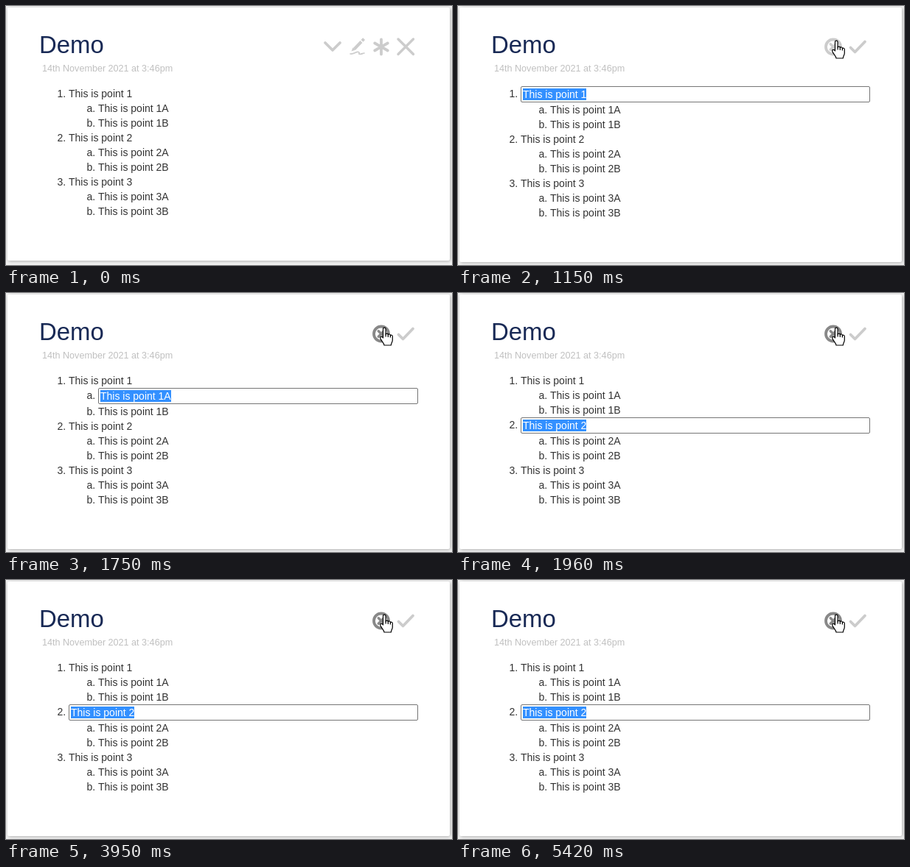
An HTML page for the animation above (5.55 s loop, 605 by 352 pixels).

```html
<!DOCTYPE html>
<html lang="en">
<head>
<meta charset="utf-8">
<title>Reordering a list</title>
<style>
  html, body { margin: 0; width: 100%; height: 100%; overflow: hidden; }
  body {
    position: relative;
    background: #f4f4f4;
    color: #333;
    font: 14px/20px "Liberation Sans", Arial, sans-serif;
  }
  .card {
    position: absolute; left: 2px; top: 2px; width: 600px; height: 344px;
    background: #fff; border-radius: 2px;
    box-shadow: 1px 1px 5px rgba(0, 0, 0, .3);
  }
  .editing .card { height: 346px; }
  h1, .date, .list { position: absolute; margin: 0; white-space: nowrap; }
  h1 { left: 45px; top: 33px; font-size: 32.9px; line-height: 40px; font-weight: 300; color: #182955; }
  .date { left: 49px; top: 75px; font-size: 12.6px; color: #c0c0c0; }
  .list { left: 45px; top: 109px; width: 514px; }
  ol { margin: 0; padding: 0 0 0 40px; list-style: decimal; }
  ol ol { list-style: lower-alpha; }
  .field {
    display: inline-block; vertical-align: top; box-sizing: border-box;
    width: 100%; height: 22px; padding: 2px;
    border: 1px solid #767676; border-radius: 2px;
    line-height: 16px;
  }
  .field span { display: inline-block; height: 16px; background: #3390ff; color: #fff; }
  svg { position: absolute; left: 0; top: 0; }
  .icon { fill: none; stroke: #ccc; stroke-width: 3.8; stroke-linecap: round; stroke-linejoin: round; }
  .edit, .editing .view { display: none; }
  .editing .edit { display: inline; }
</style>
</head>
<body>
<div class="card"></div>
<h1>Demo</h1>
<div class="date">14th November 2021 at 3:46pm</div>
<div class="list"></div>

<svg width="605" height="352" viewBox="0 0 605 352">
  <g class="icon view">
    <path d="M433 50l10 10 10-10"/>
    <path stroke-width="4" stroke-linecap="butt" d="M472.5 58.5L482 48.500M483 47.400l2.600-2.800"/>
    <path stroke="none" fill="#ccc" d="M468.500 61.500l2-5 3.500 3.300z"/>
    <path stroke-width="1.700" d="M467 65c5 1 8-3.500 11-2.500s-1 3 2 3 4-1.500 6-1.500"/>
    <path class="hover" d="M509 45.500v20M500.300 50.500l17.400 10M517.700 50.500l-17.400 10"/>
    <path stroke-width="3.400" d="M532 45l20.500 20.500M552.500 45L532 65.500"/>
  </g>
  <g class="icon edit">
    <g class="hover">
      <circle cx="509" cy="55.500" r="10"/>
      <path stroke-width="3.400" d="M505.300 51.800l7.400 7.400M512.700 51.800l-7.400 7.400"/>
    </g>
    <path d="M532.500 56.500l6 6 13.500-14"/>
  </g>
  <g id="cursor" stroke="#000" stroke-linejoin="round" fill="#fff">
    <circle id="click" r="12" fill="#ff0" fill-opacity=".47" stroke="none"/>
    <path id="arrow" d="M.5.500v16l3.700-3.500 2.600 6 2.300-1-2.600-5.800h5.200z"/>
    <g id="hand" stroke-width="1.200">
      <path d="M-1.500 14V2a1.800 1.800 0 0 1 3.600 0V9a1.700 1.700 0 0 1 3.200.5v.5a1.600 1.600 0 0 1 3.100.6v.6a1.500 1.500 0 0 1 2.900.6V17c0 3-2 4-2 7H0c0-3-4-5.500-5.200-9.500-.7-2.500 2-3 3.700-.500z"/>
      <path fill="none" d="M2.100 8.500v4M5.300 9.500v3.500M8.400 10.500v3"/>
    </g>
  </g>
</svg>

<script>
const LOOP = 5550, EDIT_START = 1150;

// start time, order of the points, item being edited
const states = [
  [0, '123', ''],
  [EDIT_START, '123', '1'],
  [1750, '123', '1A'],
  [1820, '123', '1B'],
  [1960, '123', '2'],
  [3220, '213', '2'],
  [3950, '123', '2'],
  [4490, '132', '2'],
  [5420, '123', '2']
];

const track = [[523, 161], [523, 132], [520, 92], [517, 58], [514, 38], [513, 42], [513, 47]];
const TRACK_START = 200, TRACK_STEP = 68.3;

const $ = selector => document.querySelector(selector);
const list = $('.list'), cursor = $('#cursor'), arrow = $('#arrow'), hand = $('#hand'), click = $('#click');
const hoverIcons = document.querySelectorAll('.hover');
const show = (node, visible) => { node.style.display = visible ? 'inline' : 'none'; };

function listMarkup(order, active) {
  const item = (id, children = '') => {
    const text = `This is point ${id}`;
    const label = id === active ? `<div class="field"><span>${text}</span></div>` : text;
    return `<li>${label}${children}</li>`;
  };
  const points = [...order].map(n => item(n, `<ol>${item(n + 'A')}${item(n + 'B')}</ol>`));
  return `<ol>${points.join('')}</ol>`;
}

let current;
function render(t) {
  const state = states.findLast(([start]) => start <= t);
  if (state !== current) {
    current = state;
    list.innerHTML = listMarkup(state[1], state[2]);
  }
  document.body.classList.toggle('editing', t >= EDIT_START);

  const step = Math.floor((t - TRACK_START) / TRACK_STEP);
  show(cursor, t >= TRACK_START);
  if (t >= TRACK_START) {
    const [x, y] = track[Math.min(step, track.length - 1)];
    cursor.setAttribute('transform', `translate(${x} ${y})`);
    show(hand, y < 68);
    show(arrow, y >= 68);
  }
  show(click, t >= 950 && t < EDIT_START);

  // the icon under the pointer darkens over 150 ms
  const since = t - (t < EDIT_START ? 420 : EDIT_START);
  const shade = Math.round(204 - 68 * Math.min(1, Math.max(0, since / 140)));
  hoverIcons.forEach(icon => { icon.style.stroke = `rgb(${shade},${shade},${shade})`; });
}

const begin = performance.now();
function tick() {
  render((performance.now() - begin) % LOOP);
  requestAnimationFrame(tick);
}
tick();
</script>
</body>
</html>
```
